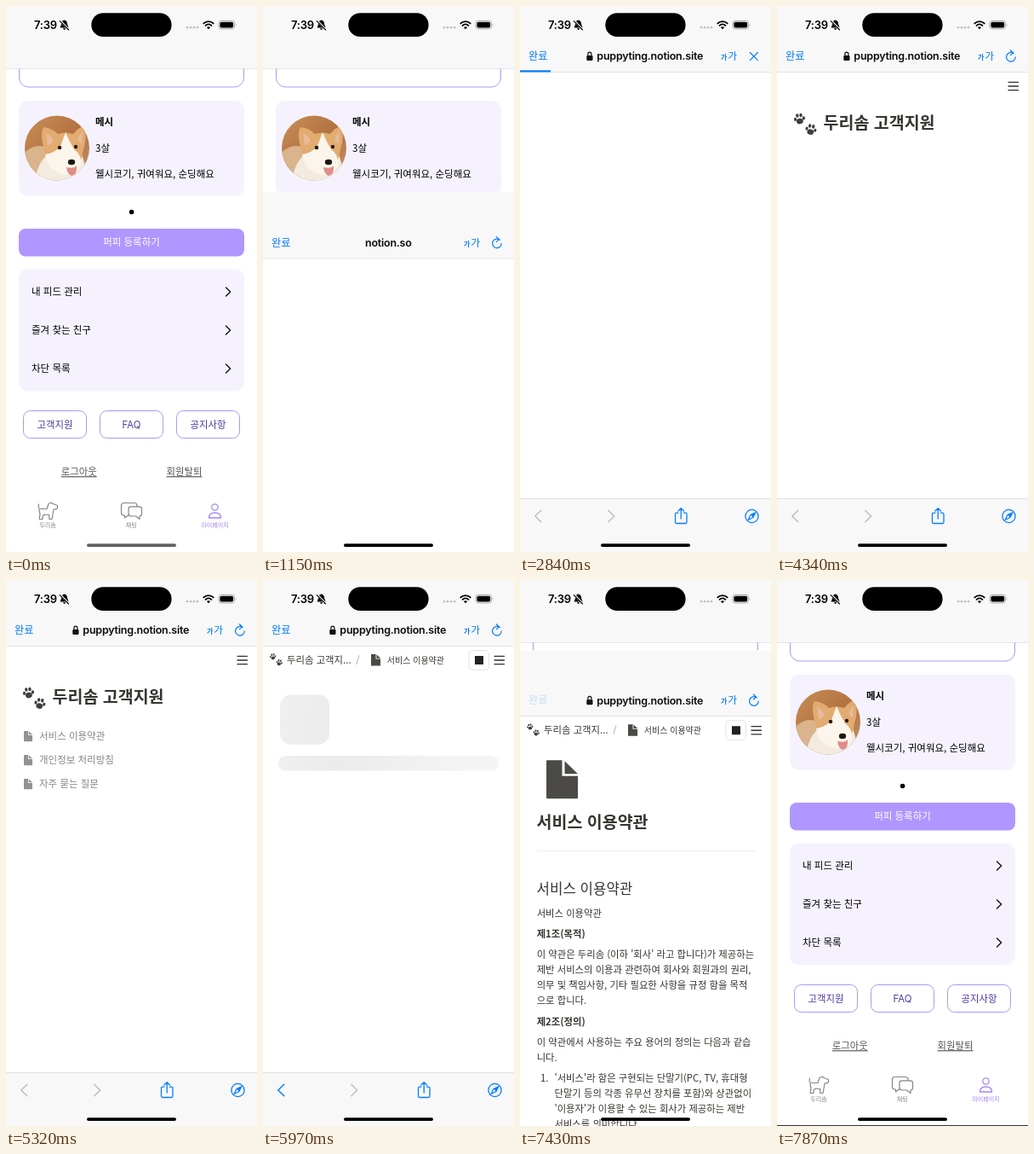
An HTML page for the animation above (8000 ms loop, 295 px wide and 640 px high).

```html
<!DOCTYPE html>
<html lang="ko">
<head>
<meta charset="utf-8">
<title>마이페이지</title>
<style>
html, body { margin: 0; width: 100%; height: 100%; overflow: hidden; background: #fff; }
svg { display: block; width: 295px; height: 640px; }
text { font-family: "Noto Sans CJK KR", "Noto Sans CJK", "Noto Sans CJK JP", sans-serif; white-space: pre; }
.latin { font-family: Inter, "Noto Sans CJK KR", sans-serif; }
.line { fill: none; stroke-linecap: round; stroke-linejoin: round; }
</style>
</head>
<body>
<svg id="stage" viewBox="0 0 295 640" xmlns="http://www.w3.org/2000/svg"></svg>
<script>
const LOOP = 8000;
const BLUE = '#067cfd', BAR = '#f8f8f8', RULE = '#dedede', LILAC = '#f5f2fe',
  PURPLE = '#9f86f6', EDGE = '#ab97f8', DEEP = '#51399f', INK = '#37352f', DIM = '#bdbdc0';
const APP = '두리솜';

// Text centred vertically on cy
function txt(x, cy, s, size = 11.5, o = {}) {
  const { fill = '#000', w = 400, at = 'start', cls = '', ls = 0, extra = '' } = o;
  return `<text x="${x}" y="${(cy + size * 0.37).toFixed(2)}" font-size="${size}" font-weight="${w}"
    fill="${fill}" text-anchor="${at}" class="${cls}" letter-spacing="${ls}" ${extra}>${s}</text>`;
}
const box = (x, y, w, h, r, fill, stroke = 'none') =>
  `<rect x="${x}" y="${y}" width="${w}" height="${h}" rx="${r}" fill="${fill}" stroke="${stroke}"/>`;
const line = (d, color, w = 1.2, id = '') =>
  `<path ${id && `id="${id}"`} class="line" d="${d}" stroke="${color}" stroke-width="${w}"/>`;
const group = (id, body) => `<g id="${id}">${body}</g>`;
const mid = (o) => ({ at: 'middle', ...o });

const paws = (x, y, k) => `<g transform="translate(${x} ${y}) scale(${k})" fill="#3f3f3f">
  <use href="#paw" transform="translate(7 7) rotate(-8)"/><use href="#paw" transform="translate(20.3 19.6) rotate(12)"/></g>`;
const sheetIcon = (x, y, k) => `<path transform="translate(${x} ${y}) scale(${k})" fill="#4b4a47"
  d="M1 0H18.5V18.5H37V44Q37 45 36 45H1Q0 45 0 44V1Q0 0 1 0ZM21.5 1L37 16H21.5Z"/>`;

const defs = `<defs>
  <g id="paw"><ellipse cy="2.6" rx="3.9" ry="3.3"/><ellipse cx="-5" cy="-.4" rx="1.6" ry="2.1"/>
    <ellipse cx="-2.1" cy="-4.3" rx="1.7" ry="2.3"/><ellipse cx="2.1" cy="-4.3" rx="1.7" ry="2.3"/>
    <ellipse cx="5" cy="-.4" rx="1.6" ry="2.1"/></g>
  <clipPath id="round"><circle cx="60" cy="166.5" r="38"/></clipPath>
  <linearGradient id="wall" x2="1" y2="1"><stop stop-color="#c98f58"/><stop offset=".55" stop-color="#b0703f"/>
    <stop offset="1" stop-color="#c79a70"/></linearGradient>
  <linearGradient id="glow" gradientUnits="userSpaceOnUse" x1="-60" x2="235">
    <stop stop-color="#f4f4f4"/><stop offset=".5" stop-color="#ebebeb"/><stop offset="1" stop-color="#f4f4f4"/></linearGradient>
</defs>`;

const photo = `<g clip-path="url(#round)">
  <rect x="22" y="128" width="77" height="77" fill="url(#wall)"/>
  <path d="M22 172Q34 160 48 166L62 206H22Z" fill="#d9b48c"/>
  <path d="M34 206Q38 176 56 172H88Q96 190 92 206Z" fill="#f3ebe0"/>
  <path d="M46 172Q39 150 44 142Q54 143 61 150Q70 147 79 150Q85 142 92 141Q96 154 91 168Q88 190 74 192Q52 190 46 172Z" fill="#e2ab70"/>
  <path d="M47 149Q53 151 56 159L49 164Z" fill="#e9b99a"/><path d="M90 147Q86 151 84 157L89 162Z" fill="#e9b99a"/>
  <path d="M70 148Q74 158 80 168Q91 176 87 189Q82 199 72 198Q50 196 46 174Q58 172 64 164Z" fill="#fbf5ec"/>
  <circle cx="63" cy="166" r="2.3" fill="#2a1d16"/><circle cx="82" cy="165" r="2.2" fill="#2a1d16"/>
  <path d="M71 189Q80 191 83 187Q84 198 77 199Q72 197 71 189Z" fill="#e08c8b"/>
  <ellipse cx="77" cy="183" rx="4.2" ry="3.3" fill="#1d1716"/></g>`;

const chevron = (y) => line(`M258.5 ${y - 5}L263.7 ${y}L258.5 ${y + 5}`, '#111', 1.4);
const pill = (x, s, o = {}) => box(x + .5, 474.5, 74, 32, 8, '#fff', EDGE) +
  txt(x + 37.5, 490.5, s, 11.4, mid({ fill: DEEP, w: 500, ...o }));

const home = `<rect width="295" height="640" fill="#fff"/>` +
  box(15.5, 40, 264, 55, 11, '#fff', EDGE) +
  `<rect width="295" height="73" fill="${BAR}"/><rect y="73" width="295" height=".8" fill="${RULE}"/>` +
  box(15, 111, 265, 111.5, 11, LILAC) + photo +
  txt(105, 136, '메시', 11.5, { w: 600 }) + txt(105, 166.5, '3살') +
  txt(105, 197, '웰시코기, 귀여워요, 순딩해요') +
  `<circle cx="147.6" cy="241.5" r="2.8"/>` +
  box(15, 261, 265, 32.5, 8, '#b096ff') + txt(147.5, 277, '퍼피 등록하기', 11.5, mid({ fill: '#fff' })) +
  box(15, 308.5, 265, 143, 11, LILAC) +
  ['내 피드 관리', '즐겨 찾는 친구', '차단 목록'].map((s, i) => txt(30, 335 + 45 * i, s) + chevron(335 + 45 * i)).join('') +
  pill(20, '고객지원') + pill(110, 'FAQ', { cls: 'latin', w: 400 }) + pill(200, '공지사항') +
  [[85.8, '로그아웃'], [209.5, '회원탈퇴']].map(([x, s]) =>
    txt(x, 546, s, 11.4, mid({ fill: '#555', extra: 'text-decoration="underline"' }))).join('') +
  line('M38.5 584Q36.8 589 41 589.5H48L50 583.5L53.5 582L55 583.5L60.5 585.5V588Q60 590 56 590L55 596L54 601.5H50.8V596.5L45.5 596L43 598V601.5H39.2L40 595.5L38.8 590', '#858585', 1.2) +
  line('M143.5 597L139.5 600V597H138Q135.5 597 135.5 594V585.5Q135.5 582.5 138.5 582.5H151Q154 582.5 154 585.5V586.5M147 586.8H156.5Q159.5 586.8 159.5 589.5V595Q159.5 598 157 598V601.5L152.5 598H147Q144 598 144 595V589.5Q144 586.8 147 586.8Z', '#858585', 1.2) +
  `<circle class="line" cx="245.5" cy="587.5" r="3.7" stroke="${PURPLE}" stroke-width="1.3"/>` +
  line('M238.5 600Q238.5 594 245.5 594T252.5 600Z', PURPLE, 1.3) +
  txt(49, 608.5, APP, 7.1, mid({ fill: '#858585' })) + txt(147.3, 608.5, '채팅', 7.1, mid({ fill: '#858585' })) +
  txt(245.5, 608.5, '마이페이지', 7.1, mid({ fill: PURPLE }));

const site = { fill: '#0b0b0b', w: 600, cls: 'latin', ls: -.22 };
const browserBars = `<rect width="295" height="77" fill="${BAR}"/><rect y="77" width="295" height=".8" fill="${RULE}"/>` +
  `<rect y="577" width="295" height="63" fill="${BAR}"/><rect y="577" width="295" height=".8" fill="${RULE}"/>` +
  group('done', txt(10, 58.5, '완료', 12.2, { fill: BLUE })) +
  group('shortUrl', txt(147.3, 58.7, 'notion.so', 12.5, mid(site))) +
  group('longUrl', line('M79.9 58.5V56.3A2 2.2 0 0 1 83.9 56.3V58.5', '#111', 1.2) + box(78.3, 58, 7.2, 6, 1.2, '#111') +
    txt(90.3, 58.7, 'puppyting.notion.site', 12.5, site)) +
  txt(236, 60, '가', 8, { fill: BLUE, w: 600 }) + txt(244.2, 58.8, '가', 11.8, { fill: BLUE, w: 500 }) +
  group('reload', line('M278.3 55.7A5.3 5.3 0 1 0 280.2 59.8M274.3 51.8L277.5 54.7L274.5 57.7', BLUE, 1.2)) +
  group('stop', line('M270.3 54.5L279.5 63.7M279.5 54.5L270.3 63.7', BLUE, 1.2)) +
  `<rect id="progress" y="75.3" height="2.2" fill="${BLUE}"/>` +
  line('M24.8 591.2L17.8 598L24.8 604.8', DIM, 1.5, 'back') + line('M103.8 591.2L110.7 598L103.8 604.8', DIM, 1.5) +
  line('M186 594.2H184Q182.5 594.2 182.5 595.7V605Q182.5 606.5 184 606.5H194.5Q196 606.5 196 605V595.7Q196 594.2 194.5 594.2H192.5M189.2 601V589M185.8 592L189.2 588.6L192.6 592', BLUE, 1.3) +
  `<circle class="line" cx="272.5" cy="598" r="7.6" stroke="${BLUE}" stroke-width="1.3"/>
   <path d="M276.8 593.7L274 599.5L268.2 602.3L271 596.5Z" fill="none" stroke="${BLUE}" stroke-width="1.2"/>
   <path d="M276.8 593.7L274 599.5L271 596.5Z" fill="${BLUE}"/>`;

const TERMS = '서비스 이용약관';
const linkRow = (s, i) => sheetIcon(21, 177 + 28 * i, .27) + txt(39, 183 + 28 * i, s, 11.5, { fill: INK, w: 500 });
const support = paws(19.5, 125.5, 1) + txt(54.5, 136.5, APP + ' 고객지원', 19.5, { fill: INK, w: 700 });
const crumbs = paws(7.8, 86, .56) + txt(28, 94, APP + ' 고객지...', 11.4, { fill: INK }) +
  txt(111.5, 94, '/', 11, mid({ fill: '#9a9a97' })) + sheetIcon(127, 87, .3) + txt(145.8, 94, TERMS, 10, { fill: INK }) +
  box(242, 82.5, 23.5, 23, 4.5, '#fff', '#e4e4e4') + box(249, 89, 10, 10, 0, '#222');
const body = (x, y, s, o = {}) => txt(x, y, s, 11.35, { fill: INK, ...o });
const terms = sheetIcon(31, 129, 1) + txt(19.5, 201.5, TERMS, 19.5, { fill: INK, w: 700 }) +
  `<rect x="20" y="235" width="257" height="1" fill="#ebebea"/>` +
  txt(19.5, 279.5, TERMS, 16.8, { fill: INK, w: 500 }) + body(19.7, 309, TERMS) +
  body(19.7, 332.5, '제1조(목적)', { w: 700 }) +
  [`이 약관은 ${APP} (이하 '회사' 라고 합니다)가 제공하는`, '제반 서비스의 이용과 관련하여 회사와 회원과의 권리,',
    '의무 및 책임사항, 기타 필요한 사항을 규정 함을 목적', '으로 합니다.'].map((s, i) => body(19.7, 357 + 18 * i, s)).join('') +
  body(19.7, 435.5, '제2조(정의)', { w: 700 }) +
  body(19.7, 459.5, '이 약관에서 사용하는 주요 용어의 정의는 다음과 같습') + body(19.7, 477.5, '니다.') +
  body(24, 502, '1.') +
  ["'서비스'라 함은 구현되는 단말기(PC, TV, 휴대형", '단말기 등의 각종 유무선 장치를 포함)와 상관없이',
    "'이용자'가 이용할 수 있는 회사가 제공하는 제반", '서비스를 의미합니다.'].map((s, i) => body(40.5, 502 + 17.8 * i, s)).join('') +
  body(24, 578.5, '2.') + body(40.5, 578.5, "'이용자'란 이 약관에 따라 회사가 제공하는 서비스");

const browser = `<rect width="295" height="640" fill="#fff"/>` +
  group('menu', line('M272 89.3H283.5M272 94H283.5M272 98.7H283.5', '#32302c', 1.3)) +
  group('support', support) + group('links', [TERMS, '개인정보 처리방침', '자주 묻는 질문'].map(linkRow).join('')) +
  group('crumbs', crumbs) +
  group('bones', box(20, 134.5, 58, 58.5, 13, 'url(#glow)') + box(18, 206, 259, 17.5, 8.7, 'url(#glow)')) +
  group('terms', terms) + browserBars;

const status = txt(33, 22, '7:39', 13, { w: 600, cls: 'latin', ls: -.25 }) +
  `<path d="M68.5 16.6Q72 17.2 72 21L73.6 25.5H63.6L65.2 21Q65.2 17.2 68.5 16.6ZM67 26.3H70.2Q69.8 28 68.6 28T67 26.3Z"/>` +
  line('M63.4 17.2L74 27.8', BAR, 2.4) + line('M63.2 17.6L73.6 28', '#000', 1.1) +
  box(100.3, 8.3, 94.3, 27.8, 13.9, '#000') +
  [213, 217, 221, 225].map(x => `<circle cx="${x}" cy="25.2" r="1.35" fill="#c2c2c4"/>`).join('') +
  line('M232.3 20.4A8.3 8.3 0 0 1 243.7 20.4M234.6 22.9A5 5 0 0 1 241.4 22.9', '#000', 1.9) +
  `<path d="M238 27.2L235.9 25Q238 23.3 240.1 25Z"/>` +
  box(250, 17.3, 18.6, 9.6, 3, 'none', '#a8a8a8') + box(251.4, 18.7, 15.8, 6.8, 1.9, '#000') +
  `<path d="M269.9 20.4Q271.3 22.1 269.9 23.8Z" fill="#a8a8a8"/>` +
  `<rect id="grip" x="95" y="630.2" width="105" height="3.8" rx="1.9"/>` +
  `<rect id="edge" y="639" width="295" height="1" fill="#333"/>`;

document.getElementById('stage').innerHTML = defs + home + group('browser', browser) + status;

const el = (id) => document.getElementById(id);
const set = (id, name, v) => el(id).setAttribute(name, v);
const show = (id, on) => set(id, 'visibility', on ? 'inherit' : 'hidden');
const clamp = (v) => Math.min(1, Math.max(0, v));
const ramp = (t, a, b) => clamp((t - a) / (b - a));
const ease = (p) => 1 - (1 - p) ** 3;
// Critically damped spring, rate per second
function spring(t, start, rate) {
  const x = Math.max(0, t - start) / 1000 * rate;
  return 1 - (1 + x) * Math.exp(-x);
}

function draw(t) {
  const open = t >= 1030 && t < 7870;
  let y = t < 1720 ? 640 * (1 - spring(t, 990, 14)) : 0;
  if (t >= 7430) y = 640 * spring(t, 7400, 20);
  set('browser', 'visibility', open ? 'visible' : 'hidden');
  set('browser', 'transform', `translate(0 ${y.toFixed(2)})`);
  set('grip', 'fill', t < 1030 ? '#616161' : '#000');
  show('edge', t >= 7870);

  const loading = t >= 2000 && t < 4030;
  show('shortUrl', t < 2840);
  show('longUrl', t >= 2840);
  show('stop', loading);
  show('reload', !loading);
  show('progress', loading);
  set('progress', 'width', 36 * ease(ramp(t, 1950, 2430)) + 259 * ease(ramp(t, 3270, 3920)));
  set('progress', 'opacity', 1 - ramp(t, 3880, 4030));

  const inTerms = t >= 5430;
  show('menu', t >= 4140);
  show('support', t >= 4340 && !inTerms);
  show('links', t >= 4460 && !inTerms);
  set('links', 'opacity', ramp(t, 4440, 4690) * (t >= 5320 ? .6 : 1));
  show('crumbs', inTerms);
  show('bones', inTerms && t < 6230);
  set('glow', 'gradientTransform', `translate(${-40 * (1 - ramp(t, 5800, 5970))} 0)`);
  show('terms', t >= 6230);
  set('back', 'stroke', inTerms ? BLUE : DIM);
  set('done', 'opacity', 1 - .8 * ramp(t, 7190, 7300));
}

function tick() {
  draw(performance.now() % LOOP);
  requestAnimationFrame(tick);
}
tick();
</script>
</body>
</html>
```
